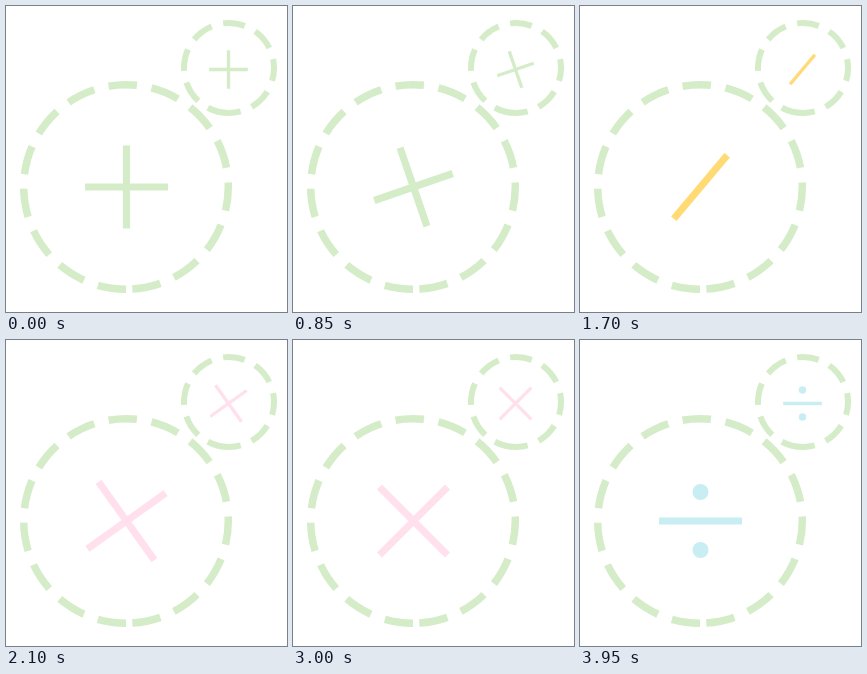
Write an HTML page that moves like this. It is 281 px wide and 306 px high and loops after 4050 ms.

```html
<!DOCTYPE html>
<html lang="en">
<head>
<meta charset="utf-8">
<title>Rotating operators</title>
<style>
  html, body { margin: 0; width: 100%; height: 100%; overflow: hidden; background: #fff; }
  svg { display: block; width: 281px; height: 306px; }
</style>
</head>
<body>
<svg viewBox="0 0 281 306" fill="none">
  <defs>
    <clipPath id="frame"><rect x="-42" y="-42" width="84" height="84"/></clipPath>
    <g id="signs" stroke-width="7.2">
      <path class="sign" stroke="#d5ecc8" d="M-41.5 0H41.5M0-41.5V41.5"/>
      <path class="sign" stroke="#ffda75" d="M-41.5 0H41.5"/>
      <path class="sign" stroke="#ffe0ec" d="M-34-34L34 34M-34 34L34-34"/>
      <g class="sign">
        <path stroke="#c8eef3" d="M-41.5 0H41.5"/>
        <g fill="#c8eef3"><circle cy="-29" r="8"/><circle cy="29" r="8"/></g>
      </g>
    </g>
  </defs>
  <!-- each ring starts its dashes at the bottom point -->
  <g stroke="#d5ecc8">
    <circle r="102.3" transform="translate(120 181) rotate(90)" stroke-width="7.5" stroke-dasharray="28.6 14.75"/>
    <circle r="45" transform="translate(223 62) rotate(90)" stroke-width="6" stroke-dasharray="22 11.8"/>
  </g>
  <g transform="translate(120.5 181)" clip-path="url(#frame)"><use href="#signs"/></g>
  <g transform="translate(222.5 63.5) scale(.465)" clip-path="url(#frame)"><use href="#signs"/></g>
</svg>
<script>
  const STEP = 50, LOOP = 4050;
  const signs = document.querySelectorAll('.sign');

  // Each sign makes a linear half turn, then rests until the next appears (ms).
  const phases = [
    { show: 0, from: 0, to: 950 },
    { show: 1050, from: 1050, to: 1950 },
    { show: 2050, from: 2050, to: 3000 },
    { show: 3100, from: 3050, to: 3950 }
  ];

  function draw(time) {
    const t = Math.floor(time % LOOP / STEP) * STEP;
    const current = phases.findLastIndex(p => t >= p.show);
    const { from, to } = phases[current];
    const turn = 180 * Math.min(1, (t - from) / (to - from));
    signs.forEach((sign, i) => {
      sign.setAttribute('display', i === current ? 'inline' : 'none');
      sign.setAttribute('transform', `rotate(${turn})`);
    });
  }

  const start = performance.now();
  function tick() {
    draw(performance.now() - start);
    requestAnimationFrame(tick);
  }
  tick();
</script>
</body>
</html>
```
